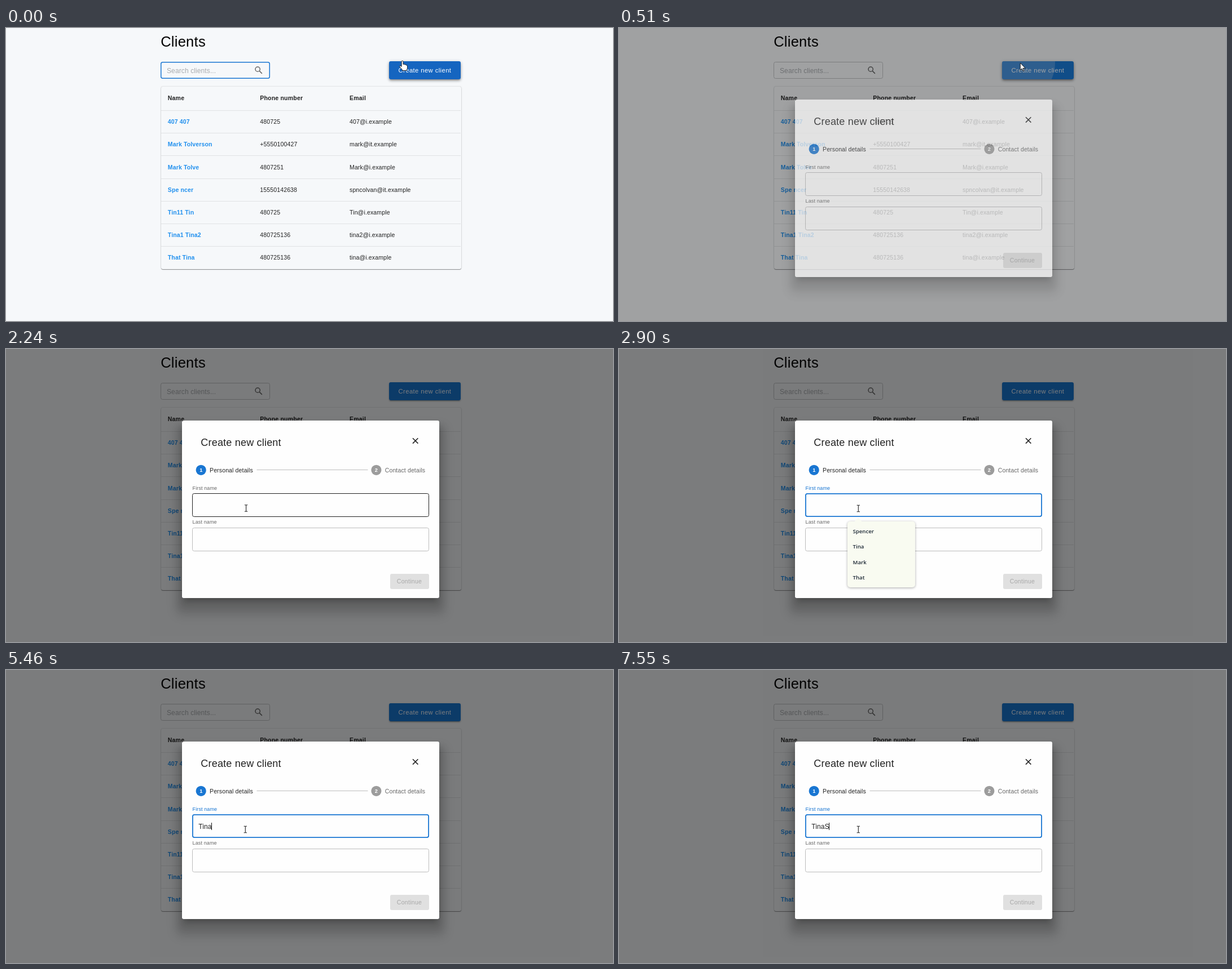
Animation, 1076 px wide and 520 px high, one loop 8 s. Source, as an HTML page:

```html
<!DOCTYPE html>
<html lang="en">
<head>
<meta charset="utf-8">
<title>Create new client</title>
<style>
html, body { margin: 0; width: 100%; height: 100%; overflow: hidden; background: #f6f8fa; }
div, svg { position: absolute; box-sizing: border-box; }
.layer, svg { left: 0; top: 0; width: 1076px; height: 520px; }
svg { overflow: visible; }
text { font-family: "Liberation Sans", Arial, sans-serif; white-space: pre; }
.bold { font-weight: bold; }
.link { font-weight: bold; fill: #2190ee; }
.option { font-family: "Open Sans", "Noto Sans", sans-serif; font-weight: 600; fill: #1b2733; }
.paper { background: #f6f8fa; border-radius: 3px;
  box-shadow: 0 1px 1px -.5px #0006, 0 1px 1px #0003, 0 0 2px #0004; }
.button { border-radius: 3px; overflow: hidden; }
.ripple { border-radius: 50%; background: #fff; }
.dialog { background: #fefefe; border-radius: 3px;
  box-shadow: 0 8px 10px -4px #0004, 0 14px 14px 6px #0000001c, 0 20px 18px 12px #0000001c; }
.popup { background: #f9fbf1; border-radius: 5px; box-shadow: 0 1px 4px #0005; }
</style>
</head>
<body>
<script>
const LOOP = 8000, BLUE = '#1976d2', INK = 'rgba(0,0,0,.87)', SOFT = 'rgba(0,0,0,.6)';
const EDGE = '#bcbcbc';

function svgNode(parent, tag, attrs) {
  const node = document.createElementNS('http://www.w3.org/2000/svg', tag);
  for (const key in attrs) node.setAttribute(key, attrs[key]);
  return parent.appendChild(node);
}
function box(parent, cls, x, y, w, h, css = '') {
  const node = document.createElement('div');
  node.className = cls;
  node.style.cssText = `left:${x}px;top:${y}px;width:${w}px;height:${h}px;${css}`;
  return parent.appendChild(node);
}
function layer() {
  const node = document.createElement('div');
  node.className = 'layer';
  return document.body.appendChild(node);
}
function label(parent, x, y, size, str, fill = INK, spacing = .11, cls = '') {
  const node = svgNode(parent, 'text', {
    x, y, fill, class: cls, 'font-size': size, 'letter-spacing': spacing
  });
  node.textContent = str;
  return node;
}
// Outlined input whose stroke grows inwards
function field(parent, x, y, w, h) {
  const node = svgNode(parent, 'rect', { rx: 3, fill: 'none' });
  return (stroke, weight) => {
    const size = { x: x + weight / 2, y: y + weight / 2, width: w - weight, height: h - weight };
    for (const key in size) node.setAttribute(key, size[key]);
    node.setAttribute('stroke', stroke);
    node.setAttribute('stroke-width', weight);
  };
}
const show = (node, on) => node.style.display = on ? '' : 'none';

// Client list
const page = layer();
const shadowBox = box(page, '', 679, 59, 127, 32, 'border-radius:3px');
const button = box(page, 'button', 679, 59, 127, 32);
const ripple = box(button, 'ripple', 0, 0, 0, 0);
box(page, 'paper', 274.5, 103.5, 532, 324);
const pageArt = svgNode(page, 'svg');
const search = field(pageArt, 274, 60, 194, 30);
label(pageArt, 274.2, 33, 25.5, 'Clients', '#000', .25);
label(pageArt, 285, 80, 12, 'Search clients...', '#a8abae');
svgNode(pageArt, 'path', {
  d: 'M15 9.5a5.5 5.5 0 1 1-11 0 5.5 5.5 0 0 1 11 0M13.5 13.5L19.8 19.8',
  transform: 'translate(439 66) scale(.75)', fill: 'none', stroke: '#666', 'stroke-width': 2
});
label(pageArt, 695.6, 79, 11.25, 'Create new client', '#fff', .4);

const columns = [286.8, 450.3, 609];
['Name', 'Phone number', 'Email'].forEach((head, i) =>
  label(pageArt, columns[i], 128.3, 10.5, head, INK, .2, 'bold'));
[
  ['407 407', '480725', '407@i.example'],
  ['Mark Tolverson', '+5550100427', 'mark@it.example'],
  ['Mark Tolve', '4807251', 'Mark@i.example'],
  ['Spe ncer', '15550142638', 'spncolvan@it.example'],
  ['Tin11 Tin', '480725', 'Tin@i.example'],
  ['Tina1 Tina2', '480725136', 'tina2@i.example'],
  ['That Tina', '480725136', 'tina@i.example']
].forEach((row, r) => {
  const y = 170.2 + r * 40.2;
  svgNode(pageArt, 'path', { d: `M275 ${Math.round(y - 24.3) + .5}H806`, stroke: '#e0e2e4' });
  row.forEach((str, i) => label(pageArt, columns[i], y, 10.5, str, INK, .14, i ? '' : 'link'));
});

const backdrop = layer();
backdrop.style.background = 'rgba(0,0,0,.5)';

// Dialog
const modal = layer();
box(modal, 'dialog', 312, 127, 456, 315);
box(modal, '', 681, 399, 69, 27, 'background:#e0e0e0;border-radius:3px');
const art = svgNode(modal, 'svg');
const first = field(art, 330, 256, 420, 42);
field(art, 330, 317, 420, 42)(EDGE, 1);
label(art, 345.3, 172.2, 18, 'Create new client', INK, .2);
svgNode(art, 'path', { d: 'M721 158.2l9.4 9.4m0-9.4l-9.4 9.4', stroke: '#222', 'stroke-width': 1.6 });
svgNode(art, 'path', { d: 'M444.5 214.5H641.5', stroke: '#bdbdbd' });
[[345.7, BLUE, 'Personal details', INK], [656.4, '#9c9c9c', 'Contact details', SOFT]]
  .forEach(([x, fill, str, ink], i) => {
    svgNode(art, 'circle', { cx: x, cy: 214.8, r: 9.1, fill });
    label(art, x, 218.2, 9.2, i + 1, '#fff', 0, 'bold').setAttribute('text-anchor', 'middle');
    label(art, x + 15.3, 218.6, 10.5, str, ink, .14);
  });
const firstLabel = label(art, 330.6, 249.8, 9, 'First name', SOFT);
label(art, 330.6, 310.4, 9, 'Last name', SOFT);
label(art, 692.8, 416.2, 10.5, 'Continue', 'rgba(0,0,0,.26)', .3);
const typed = label(art, 341.2, 281.6, 12, '');
const caret = svgNode(art, 'path', { d: 'M.5 271V284', stroke: '#111' });

// Suggestion popup
const popup = layer();
const list = box(popup, 'popup', 405, 306, 120, 34);
const popupArt = svgNode(popup, 'svg');
svgNode(popupArt, 'path', { d: 'M417 306.5L424 300L431 306.5Z', fill: '#f9fbf1' });
const options = ['Spencer', 'Tina', 'Mark', 'That'].map((name, i) =>
  label(popupArt, 414.6, 326.5 + i * 27.6, 9.6, name, '', 0, 'option'));

// Pointers, each drawn with its hot spot at 0,0
const pointerArt = svgNode(layer(), 'svg');
const solid = { fill: '#fff', stroke: '#111', 'stroke-width': .9, 'stroke-linejoin': 'round' };
const pointers = {
  hand: svgNode(pointerArt, 'path', { ...solid,
    d: 'M-1.5 10V1.3a1.5 1.5 0 0 1 3 0V6q2-1 2.8.6 2-.6 2.6.8 2-.2 2 1.8V12q0 2-1.4 4.2V17H0v-1q-2.5-3.5-5-6 .3-2 2-1.2Z' }),
  arrow: svgNode(pointerArt, 'path', { ...solid,
    d: 'M0 0V12.7L2.9 10 4.8 14.3 6.7 13.5 4.8 9.3H8.9Z' }),
  beam: svgNode(pointerArt, 'path', { fill: 'none', stroke: '#222', 'stroke-width': 1.1,
    d: 'M-2.7-5.8H-.7L0-5.2.7-5.8H2.7M0-5.2V5.2M-2.7 5.8H-.7L0 5.2.7 5.8H2.7' })
};

// Each track holds its value until the next time
const at = (track, t) => track.filter(key => key[0] <= t).pop();
const moves = [
  [0, 'hand', 702.6, 58.5], [240, 'hand', 710, 61.5], [510, 'arrow', 711.3, 62],
  [1280, 'arrow', 688, 86], [1400, 'arrow', 650.4, 127], [1540, 'arrow', 622.4, 157.5],
  [1690, 'arrow', 548, 186], [1810, 'arrow', 491.4, 209.3], [1960, 'arrow', 473.4, 221],
  [2110, 'beam', 437, 268], [2240, 'beam', 425.6, 282.5], [2380, 'beam', 424.3, 283]
];
const typing = [
  [0, ''], [3890, 'S'], [4330, ''], [4830, 'T'], [5090, 'Ti'], [5340, 'Tin'],
  [5460, 'Tina'], [7550, 'TinaS']
];
const carets = [[0, 0], [2380, 1], [2900, 0], [3470, 1], [5990, 0], [6560, 1], [7020, 0], [7550, 1]];
const fades = [[0, 0], [510, .7], [630, 1]];
const ripples = [[0, 0, 0], [360, 12, .2], [510, 70, .2], [630, 101, .12], [1280, 0, 0]];
const rest = '0 2px 1px -1px #0003, 0 2px 2px #00000024, 0 1px 4px #0000001f';
const raised = '0 2px 3px -1px #0004, 0 3px 4px #00000030, 0 1px 6px #0003';
const pressed = '0 4px 4px -2px #0003, 0 6px 7px 1px #00000024, 0 2px 10px 1px #0000001f';
const shadows = [[0, raised], [120, pressed], [510, raised], [630, rest]];

function draw(t) {
  if (t < 120) search(BLUE, 1.5);
  else search('#bfc1c3', 1);
  button.style.background = t < 510 ? '#1565c0' : BLUE;
  shadowBox.style.boxShadow = at(shadows, t)[1];
  const [, radius, alpha] = at(ripples, t);
  Object.assign(ripple.style, {
    left: 24 - radius + 'px', top: 3 - radius + 'px',
    width: 2 * radius + 'px', height: 2 * radius + 'px', opacity: alpha
  });

  backdrop.style.opacity = modal.style.opacity = at(fades, t)[1];
  const focused = t >= 2380;
  if (focused) first(BLUE, 1.8);
  else first(t < 2110 ? EDGE : '#212121', 1);
  firstLabel.setAttribute('fill', focused ? BLUE : SOFT);
  typed.textContent = at(typing, t)[1];
  const end = 341 + Math.floor(typed.getComputedTextLength());
  caret.setAttribute('transform', `translate(${end} 0)`);
  show(caret, at(carets, t)[1]);

  const full = t < 3890;
  show(popup, t >= 2500 && t < 4330);
  list.style.height = full ? '117px' : '34px';
  options.forEach((node, i) => show(node, full || !i));

  const [, kind, x, y] = at(moves, t);
  for (const name in pointers) show(pointers[name], name === kind);
  pointers[kind].setAttribute('transform', `translate(${x} ${y})`);
}

const start = performance.now();
function tick() {
  draw((performance.now() - start) % LOOP);
  requestAnimationFrame(tick);
}
tick();
</script>
</body>
</html>
```
